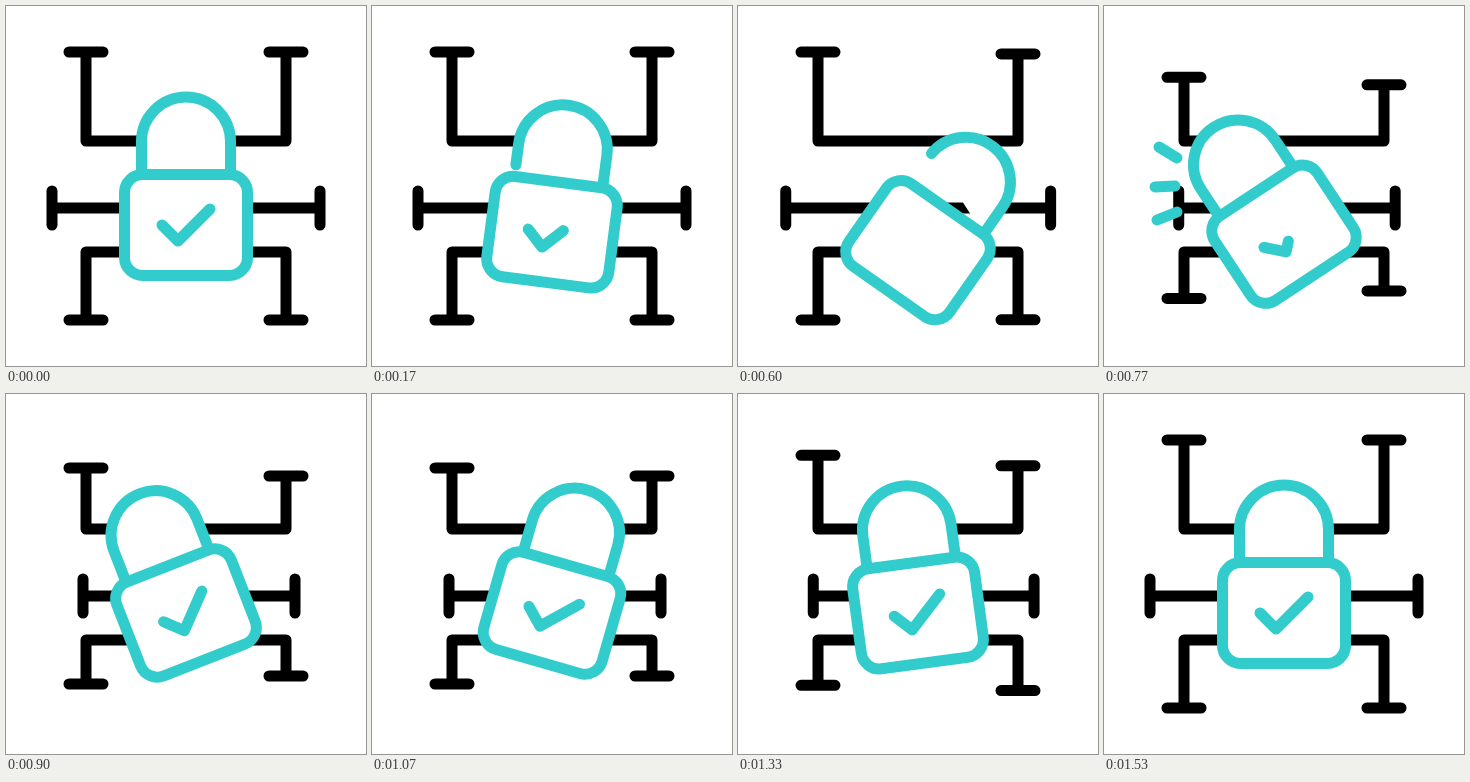
An HTML page for the animation above (1670 ms loop, 360 px wide and 360 px high).

```html
<!DOCTYPE html>
<html lang="en">
<head>
<meta charset="utf-8">
<title>Secure network lock</title>
<style>
html, body { margin: 0; width: 100%; height: 100%; overflow: hidden; background: #fff; }
svg { display: block; width: 100vw; height: 100vh; }
path, rect { stroke-width: 11; stroke-linecap: round; stroke-linejoin: round; }
.wire { fill: none; stroke: #000; }
.teal { fill: none; stroke: #33cccc; }
.solid { fill: #fff; }
</style>
</head>
<body>
<svg viewBox="0 0 360 360">
  <path id="wires" class="wire"/>
  <path id="sparks" class="teal"/>
  <g id="lock">
    <path id="shackle" class="teal solid"/>
    <rect class="teal solid" x="-61.5" y="-50.5" width="123" height="101" rx="18"/>
    <path id="check" class="teal"/>
  </g>
</svg>
<script>
const LOOP = 1670, STEP = 100 / 3, LAST = 46;
const $ = id => document.getElementById(id);
const ease = u => (1 - Math.cos(Math.PI * u)) / 2;
const mix = (a, b, u) => a + (b - a) * u;

// Eased value through [time, value] keys
function track(keys, t) {
  if (t <= keys[0][0]) return keys[0][1];
  for (let i = 1; i < keys.length; i++) {
    const [t0, v0] = keys[i - 1], [t1, v1] = keys[i];
    if (t < t1) return mix(v0, v1, ease((t - t0) / (t1 - t0)));
  }
  return keys[keys.length - 1][1];
}

const angle = [[0, 0], [560, 36.5], [580, 36.5], [800, -37.5], [1070, 16], [1330, -7.6], [1530, 0]];
const drop = [[0, 0], [467, 25.5], [575, 25.5], [900, 0]];
const gap = [[0, 0], [440, 37], [585, 37], [760, 0]];
const tick = [[0, 1], [480, 0], [600, 0], [935, 1]];

// Rest position, pulled-in position, in from/to, out from/to
const ends = {
  upLeft: [46, 74, 595, 810, 1194, 1490],
  upRight: [46, 82, 562, 815, 1238, 1505],
  left: [46, 77, 562, 810, 1298, 1530],
  right: [314, 289, 562, 815, 1238, 1505],
  lowLeft: [314, 290, 590, 812, 1298, 1530],
  lowRight: [314, 282, 590, 810, 1194, 1490]
};

// Inner and outer point of each spark
const rays = [[73, 152, 55, 141], [71, 180, 51, 181], [73, 206, 53, 214]];

const barH = (x, y) => `M${x - 17} ${y}H${x + 17}`;
const barV = (x, y) => `M${x} ${y - 17}V${y + 17}`;

function wirePath(t) {
  const p = {};
  for (const k in ends) {
    const [rest, pulled, a, b, c, d] = ends[k];
    p[k] = track([[a, rest], [b, pulled], [c, pulled], [d, rest]], t);
  }
  return `M80 ${p.upLeft}V135H280V${p.upRight}` +
    `M${p.left} 202H${p.right}` +
    `M80 ${p.lowLeft}V246H280V${p.lowRight}` +
    barH(80, p.upLeft) + barH(280, p.upRight) +
    barH(80, p.lowLeft) + barH(280, p.lowRight) +
    barV(p.left, 202) + barV(p.right, 202);
}

function shacklePath(cut) {
  const r = 44.5, cy = -83.5, leg = 33;
  if (cut <= leg) return `M${-r} ${-50.5 - cut}V${cy}A${r} ${r} 0 0 1 ${r} ${cy}V-50.5`;
  const a = (cut - leg) / r;
  return `M${-r * Math.cos(a)} ${cy - r * Math.sin(a)}A${r} ${r} 0 0 1 ${r} ${cy}V-50.5`;
}

function checkPath(u) {
  const bend = 1 / 3;
  if (u < 0.01) return "";
  if (u < bend) {
    const d = 16 * u / bend;
    return `M-24 0L${d - 24} ${d}`;
  }
  const d = 32 * (u - bend) / (1 - bend);
  return `M-24 0L-8 16L${d - 8} ${16 - d}`;
}

function sparkPath(t) {
  const head = track([[690, 0], [765, 1]], t);
  const tail = track([[775, 0], [870, 1]], t);
  if (head - tail < 0.02) return "";
  return rays.map(([x0, y0, x1, y1]) =>
    `M${mix(x0, x1, tail)} ${mix(y0, y1, tail)}L${mix(x0, x1, head)} ${mix(y0, y1, head)}`).join("");
}

function draw(ms) {
  const t = Math.min(LAST, Math.floor((ms % LOOP + 4) / STEP)) * STEP;
  $("wires").setAttribute("d", wirePath(t));
  $("sparks").setAttribute("d", sparkPath(t));
  $("shackle").setAttribute("d", shacklePath(track(gap, t)));
  $("check").setAttribute("d", checkPath(track(tick, t)));
  $("lock").setAttribute("transform", `translate(180 ${219 + track(drop, t)}) rotate(${track(angle, t)})`);
}

const start = performance.now();
function loop() {
  draw(performance.now() - start);
  requestAnimationFrame(loop);
}
loop();
</script>
</body>
</html>
```
